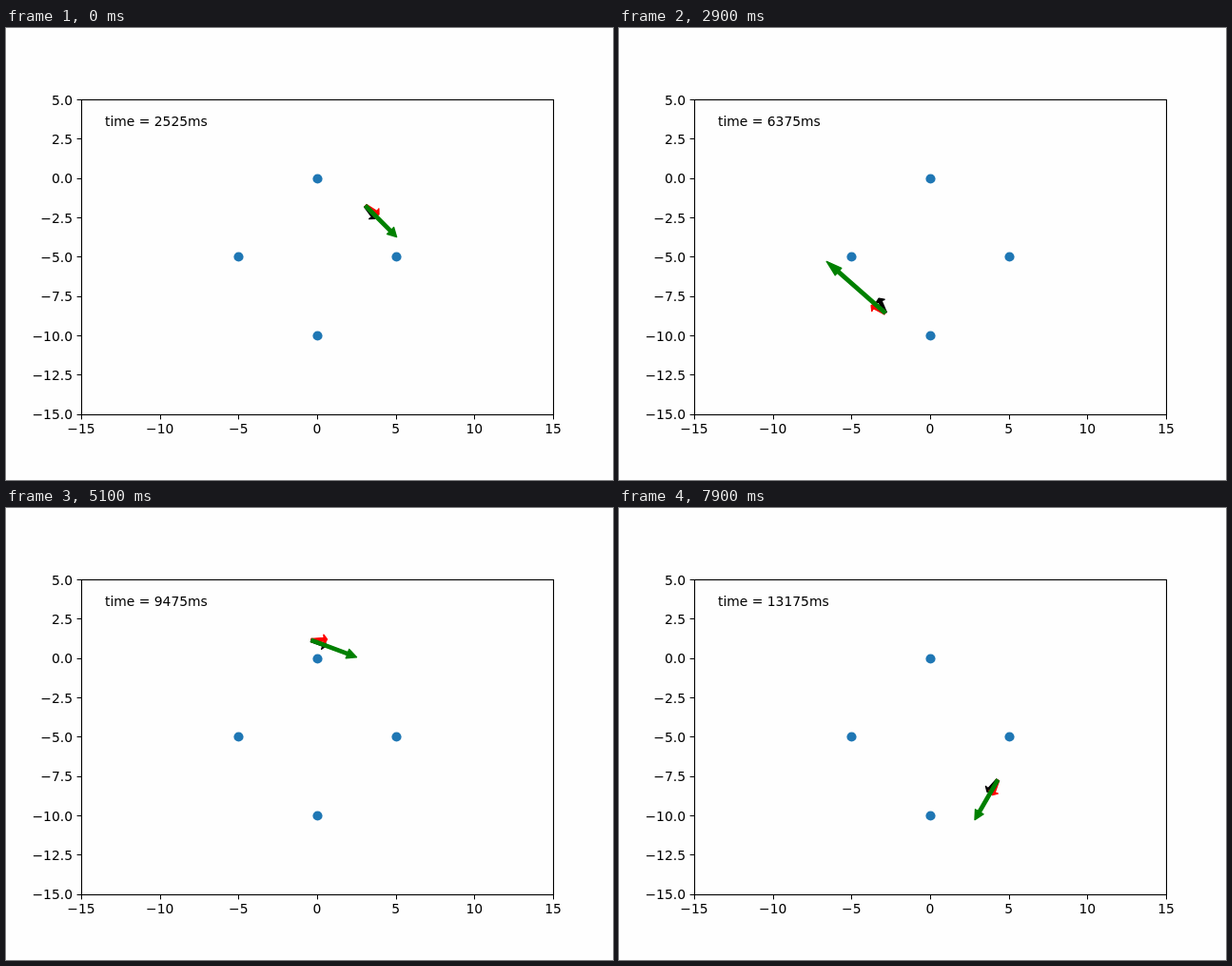
An HTML page with a canvas for the animation above (8 s loop, 638x475 px).

```html
<!DOCTYPE html>
<html lang="en">
<head>
<meta charset="utf-8">
<title>Vehicle vectors</title>
<style>
html, body { margin: 0; width: 100%; height: 100%; overflow: hidden; background: #fefefe; }
canvas { display: block; }
</style>
</head>
<body>
<canvas id="stage" width="638" height="475"></canvas>
<script>
const ctx = document.getElementById('stage').getContext('2d');
const UNIT = 496 / 30, LEFT = 79, TOP = 75.07, RIGHT = 575, BOTTOM = 406;
const px = x => LEFT + (x + 15) * UNIT;
const py = y => TOP + (5 - y) * UNIT;

// A few points on the track: step, clock (ms), position, velocity (px per clock second)
const keys = [
  [0, 2525, 378, 187, 32.6, 32.6],
  [13, 4225, 407, 280, -20, 63.5],
  [22, 5425, 346, 325.5, -70.3, 1.5],
  [35, 7200, 245, 239, -17, -90.5],
  [51, 9475, 321, 139, 47.5, 17.7],
  [66, 11350, 393, 200, 25.7, 42.6],
  [79, 13175, 398, 286, -24, 41.6]
];
const mix = (a, b, u) => a + (b - a) * u;

// Cubic Hermite curve: value and slope
function hermite(a, b, va, vb, u, span) {
  const w = 1 - u;
  return [
    mix(a, b, u * u * (3 - 2 * u)) + span * (va * u * w * w - vb * u * u * w),
    6 * u * w * (b - a) / span + va * w * (1 - 3 * u) + vb * u * (3 * u - 2)
  ];
}

function stateAt(step) {
  const i = Math.max(1, keys.findIndex(k => k[0] >= step));
  const [s0, t0, x0, y0, vx0, vy0] = keys[i - 1];
  const [s1, t1, x1, y1, vx1, vy1] = keys[i];
  const clock = Math.round(mix(t0, t1, (step - s0) / (s1 - s0)) / 25) * 25;
  const u = (clock - t0) / (t1 - t0), span = (t1 - t0) / 1000;
  const [x, vx] = hermite(x0, x1, vx0, vx1, u, span);
  const [y, vy] = hermite(y0, y1, vy0, vy1, u, span);
  return { clock, x, y, speed: Math.hypot(vx, vy), course: Math.atan2(vy, vx) };
}

function arrow(x, y, length, angle, color) {
  const shaft = UNIT * 0.1, head = UNIT * 0.3, neck = length * 0.8;
  ctx.save();
  ctx.translate(x, y);
  ctx.rotate(angle);
  ctx.beginPath();
  ctx.moveTo(0, shaft);
  ctx.lineTo(0, -shaft);
  ctx.lineTo(neck, -shaft);
  ctx.lineTo(neck, -head);
  ctx.lineTo(length, 0);
  ctx.lineTo(neck, head);
  ctx.lineTo(neck, shaft);
  ctx.closePath();
  ctx.fillStyle = ctx.strokeStyle = color;
  ctx.lineWidth = 1.39;
  ctx.lineJoin = 'round';
  ctx.fill();
  ctx.stroke();
  ctx.restore();
}

function drawVehicle({ x, y, speed, course }) {
  // Red trails the mean of the course and the lap tangent; black leads red, more so at speed
  const tangent = Math.atan2(y - py(-5), x - px(0)) + Math.PI / 2;
  const mean = Math.atan2(Math.sin(course) + Math.sin(tangent), Math.cos(course) + Math.cos(tangent));
  const red = mean - 0.21, black = red + speed * 0.0082;
  arrow(x, y, UNIT, black, '#000');
  arrow(x, y, UNIT, red, '#f00');
  arrow(x, y, speed, course, '#008000');
}

function text(str, x, y, align) {
  ctx.textAlign = align;
  ctx.fillText(str, x, y);
}

const label = (v, digits) => (v < 0 ? '\u2212' : '') + Math.abs(v).toFixed(digits);

function drawAxes() {
  ctx.fillStyle = ctx.strokeStyle = '#000';
  ctx.lineWidth = 1.11;
  ctx.strokeRect(LEFT + 0.5, 75.5, RIGHT - LEFT, BOTTOM - 75);
  for (let v = -15; v <= 15; v += 5) {
    ctx.fillRect(Math.round(px(v)), BOTTOM, 1, 5.4);
    text(label(v, 0), px(v), 426, 'center');
  }
  for (let v = -15; v <= 5; v += 2.5) {
    ctx.fillRect(LEFT - 4.4, Math.round(py(v)), 4.4, 1);
    text(label(v, 1), 70, Math.ceil(py(v) + 5), 'right');
  }
}

function drawDot(x, y) {
  ctx.beginPath();
  ctx.arc(Math.round(px(x)) + 0.5, Math.round(py(y)) + 0.5, 5.1, 0, 2 * Math.PI);
  ctx.fill();
}

function draw(step) {
  const state = stateAt(step);
  ctx.fillStyle = '#fefefe';
  ctx.fillRect(0, 0, 638, 475);
  ctx.font = '13.89px "DejaVu Sans", sans-serif';
  ctx.fillStyle = '#1f77b4';
  drawDot(0, 0);
  drawDot(5, -5);
  drawDot(0, -10);
  drawDot(-5, -5);
  drawVehicle(state);
  drawAxes();
  text(`time = ${state.clock}ms`, 104, 103, 'left');
}

const start = performance.now();
function tick() {
  draw(Math.floor((performance.now() - start) % 8000 / 100));
  requestAnimationFrame(tick);
}
tick();
</script>
</body>
</html>
```
